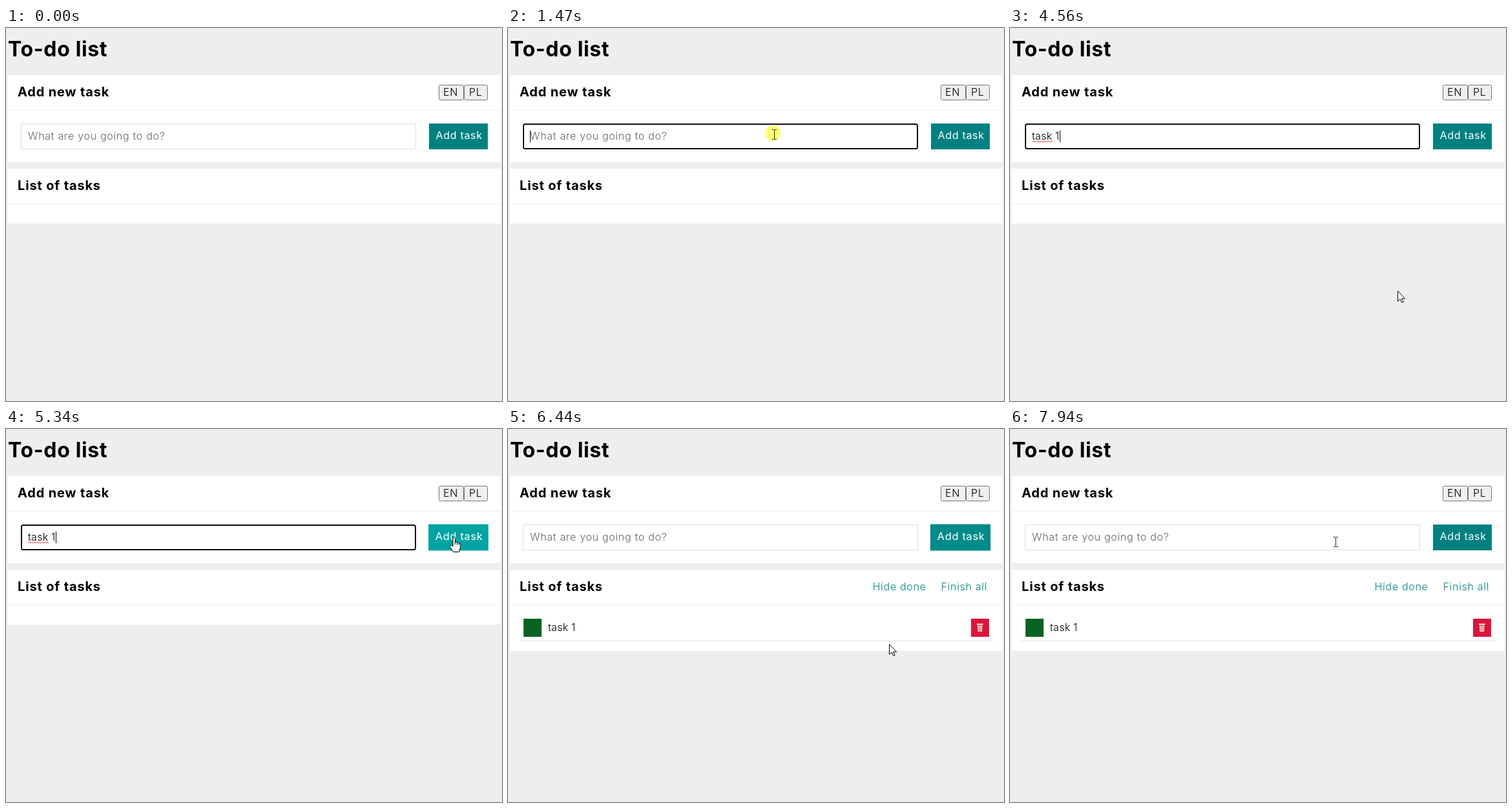
Recreate the animation shown at these times as an HTML page. Size 768 px wide and 578 px high, loop 8 s.

```html
<!DOCTYPE html>
<html lang="en">
<head>
<meta charset="utf-8">
<title>To-do list</title>
<style>
  html, body { margin: 0; width: 100%; height: 100%; overflow: hidden; background: #eee; }
  svg { display: block; width: 768px; height: 578px; }
  text { font: 300 16px Inter, "Open Sans", sans-serif; letter-spacing: .043em; white-space: pre; }
  .title { font-size: 32px; font-weight: 700; letter-spacing: .02em; }
  .heading { font-size: 20px; font-weight: 650; letter-spacing: .042em; }
  .task { letter-spacing: .015em; }
  .link { fill: #008484; }
  .lang rect { fill: #efefef; stroke: #767676; }
</style>
</head>
<body>
<svg viewBox="0 0 768 578">
  <rect width="768" height="578" fill="#eee"/>
  <text class="title" x="3" y="44">To-do list</text>

  <g fill="#fff">
    <rect x="3" y="73" width="763" height="135"/>
    <rect id="listPanel" x="3" y="218" width="763" height="85"/>
  </g>
  <path d="M3 127.5H766M3 272.5H766" stroke="#eee"/>
  <text class="heading" x="18" y="106">Add new task</text>
  <text class="heading" x="18" y="251">List of tasks</text>

  <g class="lang">
    <rect x="670.5" y="88.5" width="38" height="23" rx="2"/>
    <rect x="709.5" y="88.5" width="36" height="23" rx="2"/>
    <text x="677" y="105">EN</text>
    <text x="717" y="105">PL</text>
  </g>

  <rect id="idleField" x="23.5" y="148.5" width="611" height="39" fill="#fff" stroke="#ddd"/>
  <rect id="focusField" x="24" y="149" width="610" height="38" rx="2.5" fill="#fff" stroke="#101010" stroke-width="2"/>
  <text id="placeholder" x="34" y="173" fill="#656565">What are you going to do?</text>
  <text id="typed" class="task" x="34" y="173"></text>
  <path id="squiggle" fill="none" stroke="#e33" stroke-width=".9"/>
  <rect id="caret" y="159" width="1" height="18"/>

  <g id="button">
    <rect id="buttonFill" x="655" y="148" width="91" height="40"/>
    <text x="665.5" y="172" fill="#fff" style="font-weight:400">Add task</text>
  </g>

  <g id="task">
    <text class="link" x="564.5" y="250">Hide done</text>
    <text class="link" x="670.5" y="250">Finish all</text>
    <rect x="24" y="294" width="28" height="28" fill="#076321"/>
    <text class="task" x="62" y="313">task 1</text>
    <rect x="717" y="294" width="28" height="28" fill="#dc143c"/>
    <path d="M726 301.500H735.500V304H726ZM727 305H734.500L734 314H727.500Z" fill="#f6dcc8"/>
    <path d="M729.500 306V313M732 306V313" stroke="#dc143c" stroke-width=".8"/>
    <path d="M18 328.500H751" stroke="#ddd"/>
  </g>

  <g id="pointer">
    <circle id="press" cx="-2" cy="-1" r="12" fill="#ff0" fill-opacity=".55"/>
    <path id="arrow" d="M.5.5V16.500L4.200 13 6.700 18.500 9 17.500 6.500 12.200H11.500Z" fill="#fff" stroke="#000"/>
    <path id="beam" d="M-3.500-6.500H-1L0-6 1-6.500H3.500M0-6V8M-3.500 8.500H-1L0 8 1 8.500H3.500" fill="none" stroke="#222"/>
    <path id="hand" d="M-2 1.500a1.700 1.700 0 0 1 3.400 0V7q1.600-1 3 .8 1.600-.6 2.800.9 2-.3 2.500 1.800V16L8 19.500V22.500H-1.500L-6.500 14.500a1.800 1.800 0 0 1 2.800-2L-2 14.200ZM1.400 7V11M4.400 8V11.500M7.200 9V12" fill="#fff" stroke="#000"/>
  </g>
</svg>
<script>
const LOOP = 8000;
const CLICK_FIELD = 1470, CLICK_BUTTON = 5960, SUBMIT = 6030;
const HOVER_IN = 5180, HOVER_OUT = 6235;
const COLOR_TIME = 500, SCALE_TIME = 1000;
const BLINK = 530;

// [time, x, y] of the pointer's hot spot
const path = [
  [70, 688, 554], [260, 631, 481], [400, 631, 481], [700, 490, 290],
  [1070, 412, 165], [1270, 412, 164], [1600, 412, 164], [1900, 530, 426],
  [2000, 535, 420], [4500, 535, 420], [4560, 599, 408], [4770, 749, 289],
  [4920, 752, 265], [5180, 708, 186], [5300, 694, 168], [6130, 694, 168],
  [6230, 688, 189], [6300, 652, 268], [6370, 617, 308], [6440, 590, 333],
  [6510, 568, 353], [6580, 562, 359], [7400, 562, 359], [7700, 526, 245],
  [7940, 504, 174]
];
const typing = [[2810, "t"], [2940, "ta"], [3220, "tas"], [3480, "task"], [3830, "task "], [4170, "task 1"]];

const el = Object.fromEntries([...document.querySelectorAll("[id]")].map(e => [e.id, e]));
const show = (e, on) => e.setAttribute("visibility", on ? "visible" : "hidden");
const clamp = v => Math.max(0, Math.min(1, v));
const easeOut = v => 1 - (1 - clamp(v)) ** 3;
const inside = (x, y, left, right) => x >= left && x <= right && y >= 148 && y <= 188;

el.squiggle.setAttribute("d", "M34 177" + "l2-2 2 2".repeat(8));

function pointerAt(t) {
  const i = path.findIndex(p => p[0] > t);
  if (i < 0) return path.at(-1).slice(1);
  if (i === 0) return path[0].slice(1);
  const [t0, x0, y0] = path[i - 1], [t1, x1, y1] = path[i];
  const k = (t - t0) / (t1 - t0);
  return [x0 + (x1 - x0) * k, y0 + (y1 - y0) * k];
}

function drawField(t) {
  const focused = t >= CLICK_FIELD && t < SUBMIT;
  const last = typing.findLast(([at]) => t >= at);
  const text = focused && last ? last[1] : "";
  const blinkStart = last ? last[0] : CLICK_FIELD;
  show(el.idleField, !focused);
  show(el.focusField, focused);
  show(el.placeholder, !text);
  el.typed.textContent = text;
  show(el.squiggle, text.startsWith("task "));
  show(el.caret, focused && Math.floor((t - blinkStart) / BLINK) % 2 === 0);
  el.caret.setAttribute("x", 34 + Math.round(text ? el.typed.getComputedTextLength() : 0));
}

function drawButton(t) {
  const hover = duration => easeOut((t - HOVER_IN) / duration) - easeOut((t - HOVER_OUT) / duration);
  const shade = Math.round(128 + 51 * hover(COLOR_TIME));
  const scale = 1 + .05 * hover(SCALE_TIME);
  el.button.setAttribute("transform", `translate(700.5 168) scale(${scale}) translate(-700.5 -168)`);
  el.buttonFill.setAttribute("fill", `rgb(0 ${shade} ${shade})`);
}

function drawList(t) {
  const added = t >= SUBMIT;
  show(el.task, added);
  el.listPanel.setAttribute("height", added ? 126 : 85);
}

function drawPointer(t) {
  const [x, y] = pointerAt(t).map(Math.round);
  const visible = t >= 70;
  const beam = inside(x, y, 23, 635), hand = inside(x, y, 655, 746);
  el.pointer.setAttribute("transform", `translate(${x + (beam ? .5 : 0)} ${y})`);
  show(el.beam, visible && beam);
  show(el.hand, visible && hand);
  show(el.arrow, visible && !beam && !hand);
  show(el.press, [CLICK_FIELD, CLICK_BUTTON].some(at => t >= at && t < at + 130));
}

const start = performance.now();
function frame() {
  const t = (performance.now() - start) % LOOP;
  drawField(t);
  drawButton(t);
  drawList(t);
  drawPointer(t);
  requestAnimationFrame(frame);
}
frame();
</script>
</body>
</html>
```
